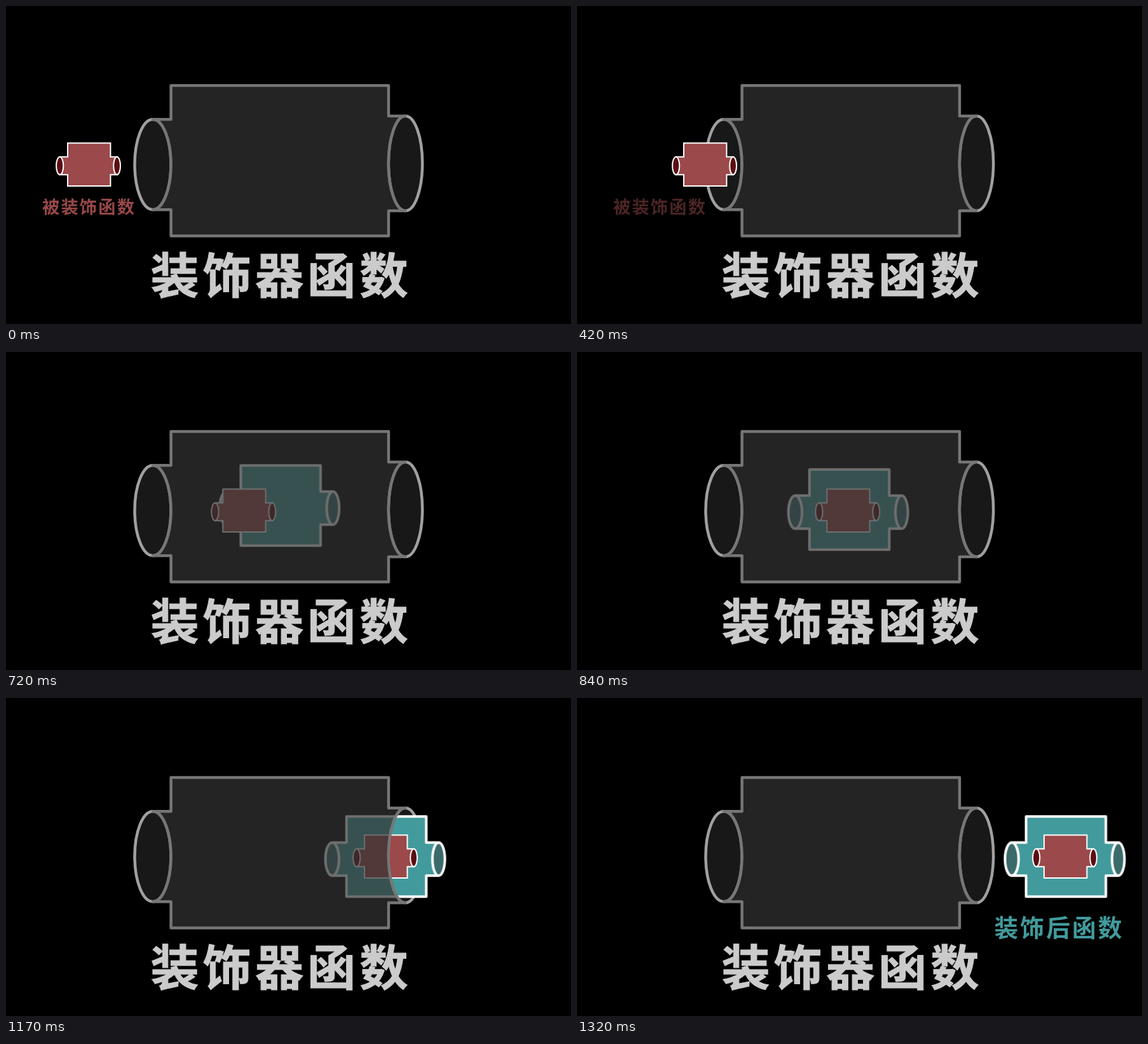
Write an HTML page that moves like this. It is 889x500 px and loops after 1.59 s.

```html
<!DOCTYPE html>
<html lang="zh-CN">
<head>
<meta charset="utf-8">
<title>装饰器函数</title>
<style>
  html, body { margin: 0; width: 100%; height: 100%; overflow: hidden; background: #000; }
  svg { display: block; width: 100%; height: 100%; }
  text {
    font-family: "Noto Sans CJK SC", "Noto Sans CJK", sans-serif;
    font-weight: 900;
    letter-spacing: .082em;
  }
  .back { fill: #181818; stroke: #a0a0a0; stroke-width: 4.5; }
  .shell { fill: #333; fill-opacity: .71; stroke: #767676; stroke-width: 4.5; }
  #inner { fill: #9b494b; stroke: #fff; stroke-width: 2; }
  #inner ellipse { fill: #5c0e12; }
  #wrapper { fill: #429a9c; stroke: #fff; stroke-width: 4; stroke-linejoin: round; }
  #wrapper ellipse { fill: #3a6a6a; }
</style>
</head>
<body>
<svg viewBox="0 0 889 500">
  <!-- far side of both openings -->
  <g class="back">
    <ellipse cx="231" cy="249.2" rx="28.5" ry="71"/>
    <ellipse cx="628.5" cy="247.5" rx="26.7" ry="74.5"/>
  </g>

  <g id="wrapper">
    <path d="M-22.5 41H0V0H125.5V41H145V93H125.5V126H0V93H-22.5Z"/>
    <ellipse cx="-22.5" cy="67" rx="10.7" ry="26"/>
    <ellipse cx="145" cy="67" rx="9.8" ry="26"/>
  </g>

  <g id="inner">
    <path d="M-12.3 237.3H0V215.5H67.4V237.3H77.6V265.2H67.4V283H0V265.2H-12.3Z"/>
    <ellipse cx="-12.3" cy="251.2" rx="5.6" ry="14"/>
    <ellipse cx="77.6" cy="251.2" rx="5.4" ry="14"/>
  </g>

  <!-- translucent body between the openings -->
  <path class="shell" stroke-linejoin="round" d="M231 178.2H259.6V125H602V173H628.5
    A26.7 74.5 0 0 0 628.5 322H602V361.5H259.6V320.2H231
    A28.5 71 0 0 0 231 178.2Z"/>

  <text x="227.5" y="452" font-size="76" fill="#cbcbcb" stroke="#cbcbcb">装饰器函数</text>
  <text id="before" x="57" y="325.5" font-size="27.2" fill="#984849">被装饰函数</text>
  <text id="after" x="656.6" y="375" font-size="37.7" fill="#429a9c">装饰后函数</text>
</svg>
<script>
  const LOOP = 1590;

  const shift = (x, y = 0) => ({ transform: `translate(${x}px, ${y}px)` });
  const fade = opacity => ({ opacity });

  // Rows: [time in ms, state, number of steps to the next row]
  function play(id, rows) {
    const frames = rows.map(([ms, state, steps = 1]) =>
      ({ ...state, offset: ms / LOOP, easing: `steps(${steps}, end)` }));
    document.getElementById(id).animate(frames, { duration: LOOP, iterations: Infinity });
  }

  play('inner', [
    [0, shift(97)],
    [300, shift(98.7), 17],
    [810, shift(393.2)],
    [1020, shift(393.2), 10],
    [1320, shift(734.9)],
    [LOOP, shift(734.9)]
  ]);

  play('wrapper', [
    [0, shift(369.4, 178.4)],
    [720, shift(369.4, 178.4), 5],
    [870, shift(364.9, 186.3)],
    [1020, shift(364.9, 186.3), 10],
    [1320, shift(706.6, 186.3)],
    [LOOP, shift(706.6, 186.3)]
  ]);
  play('wrapper', [[0, fade(0)], [720, fade(1)], [LOOP, fade(1)]]);

  play('before', [[0, fade(1)], [300, fade(.9), 9], [570, fade(0)], [LOOP, fade(0)]]);
  play('after', [[0, fade(0)], [1170, fade(0), 5], [1320, fade(1)], [LOOP, fade(1)]]);
</script>
</body>
</html>
```
